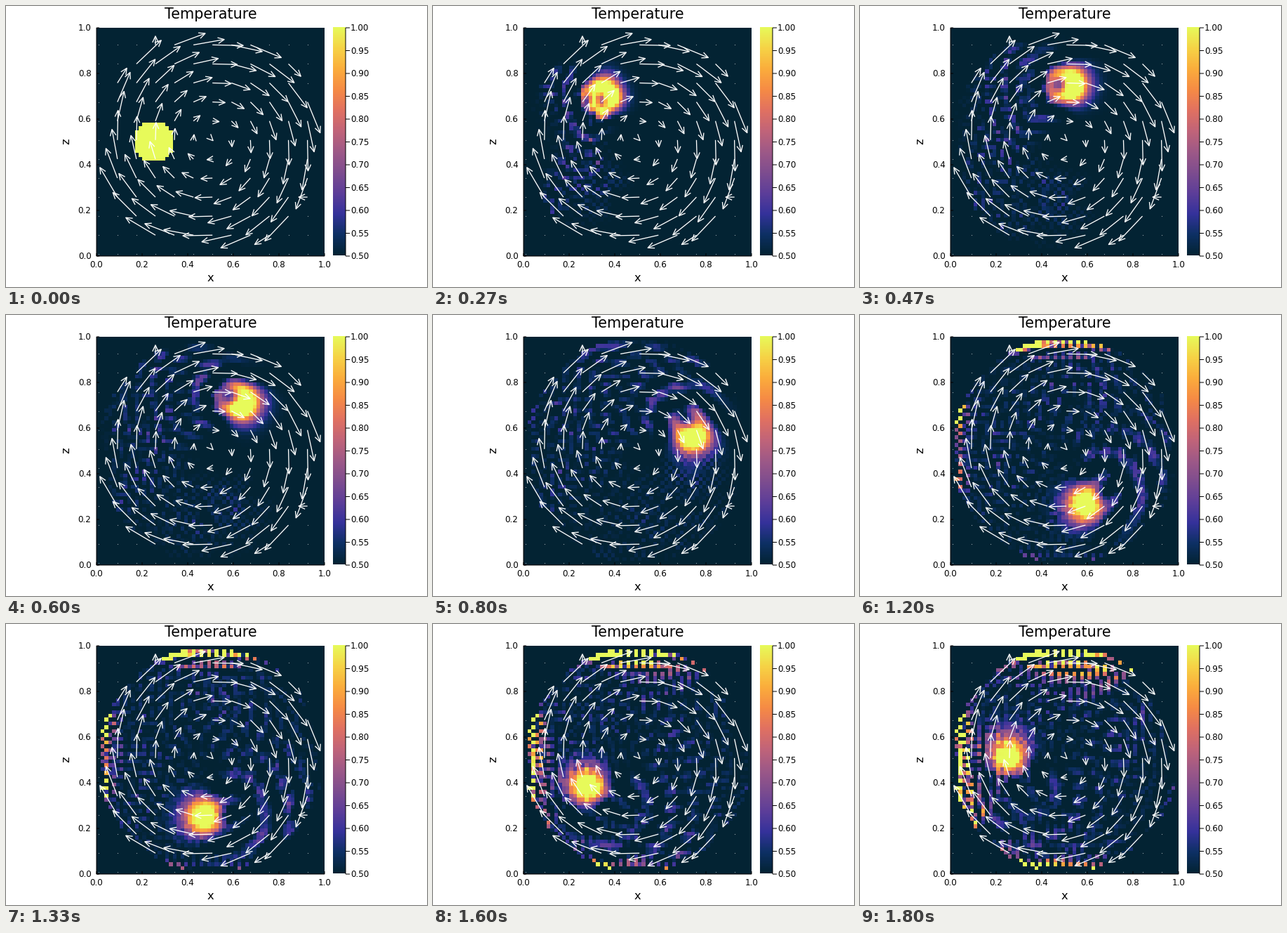
A matplotlib script that plays this animation: 600 px wide and 400 px high, repeating every 1.87 s.

```python
import numpy as np
import matplotlib.pyplot as plt
from matplotlib.animation import FuncAnimation
from matplotlib.collections import LineCollection
from matplotlib.colors import LinearSegmentedColormap

W, H, DPI = 600, 400, 100
PX = 72 / DPI                                   # points per pixel
LEFT, TOP, SIDE = 129, 31, 325
RIGHT, BOTTOM = LEFT + SIDE, TOP + SIDE
N = 60                                          # cells per side
TICK_MS, LOOP_TICKS, SHOTS = 10, 187, 28

thermal = LinearSegmentedColormap.from_list("thermal", np.array([
    (3, 35, 51), (13, 48, 100), (53, 50, 155), (93, 62, 153),
    (126, 77, 143), (158, 89, 135), (193, 100, 121), (225, 113, 97),
    (246, 139, 69), (251, 173, 60), (246, 211, 70), (231, 250, 90)]) / 255)

# Rigid rotation on a staggered grid, at rest outside the disc
cell = (np.arange(N) + 0.5) / N - 0.5
face = np.arange(N + 1) / N - 0.5
disc = 0.5 - 1 / N


def rotating(x, z, speed):
    return np.where(np.hypot(x, z) <= disc, speed, 0)


vx = rotating(face[None, :], cell[:, None], cell[:, None])
vz = rotating(cell[None, :], face[:, None], -cell[None, :])
courant = 1 / np.hypot(np.abs(vx).max(), np.abs(vz).max())
vx = (vx[:, 1:] + vx[:, :-1]) / 2
vz = (vz[1:] + vz[:-1]) / 2


def simulate():
    """Leapfrog advection of a warm circle; returns the saved fields."""
    marks = [0] + [10 * k - 1 for k in range(1, SHOTS - 1)] + [262]
    circle = np.hypot(cell[None, :] + 0.25, cell[:, None]) <= 5.3 / N
    now = 0.5 + 0.5 * circle
    old = now.copy()
    saved = []
    for step in range(marks[-1] + 1):
        if step in marks:
            saved.append(now)
        dx = np.roll(now, -1, 1) - np.roll(now, 1, 1)
        dz = np.roll(now, -1, 0) - np.roll(now, 1, 0)
        old, now = now, old - courant * (vx * dx + vz * dz)
    return saved


# Enlarge every field to whole screen pixels
pick = np.arange(SIDE) * N // SIDE
shots = [field[np.ix_(pick, pick)] for field in simulate()]
starts = np.round(np.arange(SHOTS) * 20 / 3)

plt.rcParams["font.family"] = "DejaVu Sans"
fig = plt.figure(figsize=(W / DPI, H / DPI), dpi=DPI, facecolor="white")
scale = dict(cmap=thermal, vmin=0.5, vmax=1, origin="lower")
heat = fig.figimage(shots[0], xo=LEFT, yo=H - BOTTOM, zorder=-1, **scale)
ax = fig.add_axes([0, 0, 1, 1])
ax.axis("off")
ax.imshow(np.linspace(0.5, 1, 256)[:, None], extent=(466, 484, 355.5, 30.5),
          aspect="auto", interpolation="nearest", **scale)


def label(x, y, text, px, ha="center", rotation=0):
    ax.text(x, y, text, fontsize=px * PX, ha=ha, va="baseline",
            rotation=rotation, rotation_mode="anchor", color="black")


def lines(paths, color, px, z):
    group = LineCollection(paths, colors=color, linewidths=px * PX,
                           zorder=z, capstyle="butt")
    group.set_snap(False)
    ax.add_collection(group)


# Axes and colour bar
BAR = 484
rules = [[(LEFT, TOP), (LEFT, BOTTOM)], [(LEFT, BOTTOM), (RIGHT, BOTTOM)],
         [(BAR, TOP), (BAR, BOTTOM)]]
for k in range(6):
    x, y = LEFT + SIDE * k / 5, BOTTOM - SIDE * k / 5
    rules += [[(x, BOTTOM), (x, BOTTOM - 4)], [(LEFT, y), (LEFT + 4, y)]]
    label(x, 371.5, f"{k / 5:.1f}", 11.9)
    label(121.5, y + 4.2, f"{k / 5:.1f}", 11.9, "right")
for k in range(11):
    y = BOTTOM - SIDE * k / 10
    rules.append([(BAR, y), (BAR + 6, y)])
    label(BAR + 7, y + 4.2, f"{0.5 + k / 20:.2f}", 11.9, "left")
lines(rules, "black", 1, 4)
label(LEFT + SIDE / 2, 18.5, "Temperature", 20.8)
label(LEFT + SIDE / 2, 391.5, "x", 16.3)
label(90, 192.5, "z", 16.3, rotation=90)

# Velocity arrows on every fifth cell
arrows, still = [], []
for j in range(0, N, 5):
    for i in range(0, N, 5):
        base = np.array([LEFT + SIDE * (i + 0.5) / N,
                         BOTTOM - SIDE * (j + 0.5) / N])
        move = np.array([vx[j, i], -vz[j, i]]) * 0.318 * SIDE
        size = np.hypot(*move)
        if size == 0:
            still.append(base)
            continue
        tip = base + move
        back = -move / size
        side = np.array([-back[1], back[0]])
        arrows += [[base, tip],
                   [tip + 9 * back + 4.2 * side, tip,
                    tip + 9 * back - 4.2 * side]]
lines(arrows, "white", 1.3, 3)
ax.scatter(*np.array(still).T, s=(1.2 * PX) ** 2, c="white", alpha=0.6,
           linewidths=0, zorder=3)

ax.set_xlim(0, W)
ax.set_ylim(H, 0)


def update(tick):
    heat.set_data(shots[np.searchsorted(starts, tick, "right") - 1])
    return [heat]


anim = FuncAnimation(fig, update, frames=LOOP_TICKS, interval=TICK_MS,
                     repeat=True, repeat_delay=0)
plt.show()
```
